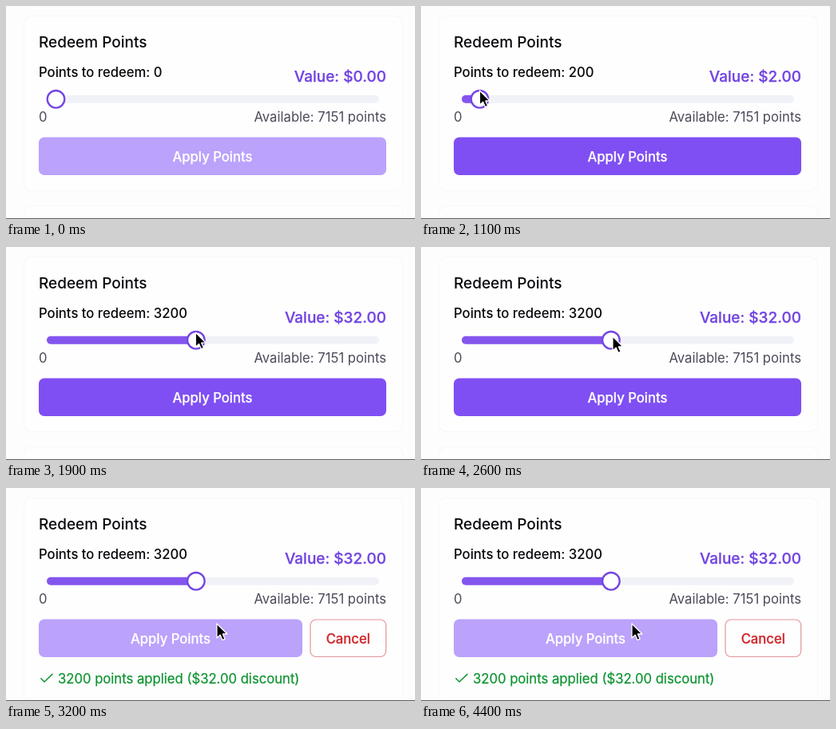
An HTML page for the animation above (4.5 s loop, 512 px wide and 267 px high).

```html
<!DOCTYPE html>
<html lang="en">
<head>
<meta charset="utf-8">
<title>Redeem points</title>
<style>
  html, body { margin: 0; width: 100%; height: 100%; overflow: hidden; background: #fdfdfe; }
  svg { display: block; width: 512px; height: 267px; }
  text { font: 400 16.66px Inter, sans-serif; fill: #4a4b58; stroke-width: .25px; }
  .card { fill: #fefeff; stroke: #f7f7fa; }
  .medium { font-weight: 500; fill: #08080c; }
  .large { font-size: 19px; }
  .end { text-anchor: end; }
  .middle { text-anchor: middle; }
  #value { fill: #7043e0; stroke: #7043e0; }
  #label { fill: #fff; stroke: #fff; }
  #cancel { fill: #d0282c; stroke: #d0282c; }
  #message { fill: #0f9430; stroke: #0f9430; }
</style>
</head>
<body>
<svg viewBox="0 0 512 267">
  <rect id="card" class="card" x="22.5" y="12.5" width="474" height="219" rx="9"/>
  <rect id="next" class="card" x="22.5" y="250.5" width="474" height="40" rx="9"/>
  <text class="medium large" x="41" y="52.3">Redeem Points</text>
  <text class="medium" id="points" x="41" y="88.5"></text>
  <text class="medium large end" id="value" x="476" y="95"></text>

  <rect x="51" y="111.7" width="416" height="10" rx="5" fill="#f1f2f8"/>
  <rect id="fill" x="51" y="111.7" height="10" rx="5" fill="#8455ee"/>
  <circle id="thumb" cy="116.8" r="10.8" fill="#fff" stroke="#7445e2" stroke-width="2.3"/>
  <text x="41" y="144.5">0</text>
  <text class="end" x="476" y="144.5">Available: 7151 points</text>

  <rect id="button" x="41" y="164.5" height="47.5" rx="7"/>
  <text class="medium middle" id="label" y="194.8">Apply Points</text>

  <g id="applied">
    <rect x="381" y="165" width="94.7" height="46.5" rx="7" fill="#fefeff" stroke="#e39598" stroke-width="1.2"/>
    <text class="medium middle" id="cancel" x="428.3" y="194.8">Cancel</text>
    <path d="M43.8 238.8l4.2 4.2 10-9.6" fill="none" stroke="#0f9430" stroke-width="1.5" stroke-linecap="round" stroke-linejoin="round"/>
    <text id="message" x="65" y="244.5">3200 points applied ($32.00 discount)</text>
  </g>

  <rect y="266" width="512" height="1" fill="#5c5c62"/>
  <path id="cursor" d="M0 0V18L4.2 14.2 7 20.6 10.2 19.2 7.4 13H13Z" fill="#000" stroke="#fff" stroke-width="1.3" stroke-linejoin="round"/>
</svg>
<script>
  const LOOP = 4500, STEP = 100, CURSOR_IN = 400, APPLIED = 3200, LAG = 10;
  const el = id => document.getElementById(id);
  const set = (id, attrs) => {
    for (const name in attrs) el(id).setAttribute(name, attrs[name]);
  };
  const show = (id, on) => set(id, { visibility: on ? 'visible' : 'hidden' });

  function ease(t, from, to) {
    const p = Math.min(1, Math.max(0, (t - from) / (to - from)));
    return p * p * (3 - 2 * p);
  }

  // A long drag, then a small correction.
  const drag = t => 3100 * ease(t, 1000, 1700) + 100 * ease(t, 1700, 2100);

  function draw(t) {
    const points = Math.round(drag(t) / 100) * 100;
    const thumbX = 62.5 + points * 0.0548;
    const applied = t >= APPLIED;
    const width = applied ? 330 : 435;

    el('points').textContent = 'Points to redeem: ' + points;
    el('value').textContent = 'Value: $' + (points / 100).toFixed(2);
    set('fill', { width: thumbX - 51 });
    set('thumb', { cx: thumbX });
    set('button', { width, fill: applied || !points ? '#bba2fb' : '#7f4ff3' });
    set('label', { x: 41 + width / 2 });
    set('card', { height: applied ? 270 : 219 });
    show('next', !applied);
    show('applied', applied);
    show('cursor', t >= CURSOR_IN);

    // The pointer runs slightly ahead of the thumb, then goes down to the button.
    const press = ease(t, 2600, 3100);
    const x = 62 + drag(t + LAG) * 0.0556 + 24 * press;
    const y = 100 + 6 * ease(t, 600, 1100) + 6 * ease(t, 1700, 2400) + 58 * press;
    set('cursor', { transform: `translate(${x} ${y})` });
  }

  const start = performance.now();
  function tick() {
    const t = (performance.now() - start) % LOOP;
    draw(Math.floor(t / STEP) * STEP);
    requestAnimationFrame(tick);
  }
  tick();
</script>
</body>
</html>
```
